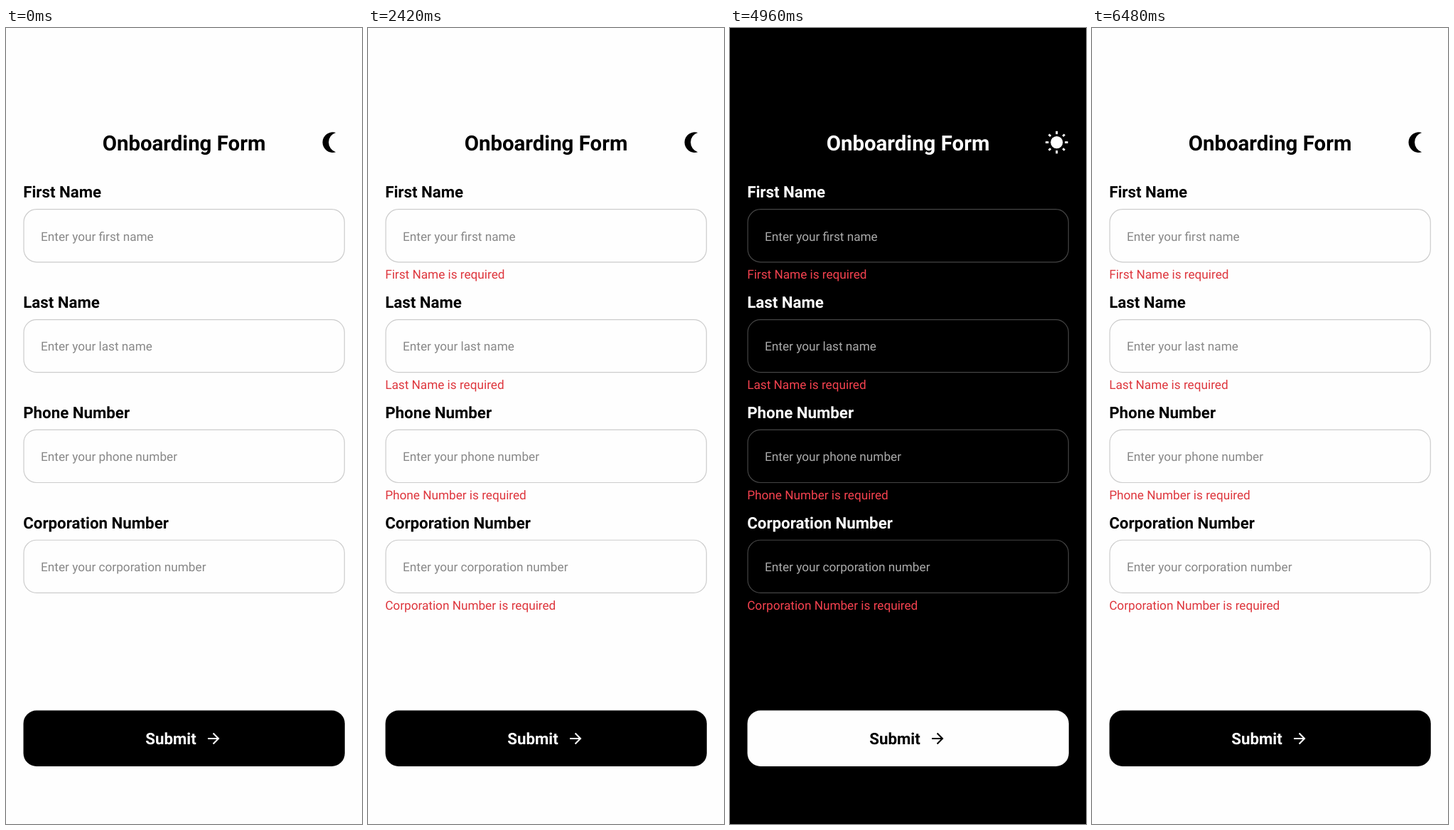
An HTML page that plays this animation: 501 px wide and 1118 px high, repeating every 7390 ms.

```html
<!DOCTYPE html>
<html lang="en">
<head>
<meta charset="utf-8">
<title>Onboarding Form</title>
<style>
  html, body { margin: 0; width: 100%; height: 100%; overflow: hidden; }

  svg {
    display: block;
    width: 501px;
    height: 1118px;
    background: var(--bg);
    font-family: Roboto, sans-serif;
    text-rendering: geometricPrecision;
    animation: theme 7390ms step-end infinite;
  }

  @keyframes theme {
    0%, 75.506% {
      --bg: #fefefe; --ink: #000; --line: #ccc; --hint: #888; --error: #de363d;
      --moon: 1; --sun: 0;
    }
    54.532% {
      --bg: #000; --ink: #fefefe; --line: #444; --hint: #aaa; --error: #f5424f;
      --moon: 0; --sun: 1;
    }
  }

  @keyframes validate {
    0% { opacity: 0; }
    32.745%, 100% { opacity: 1; }
  }

  .title, .label, .submit { font-weight: 700; fill: var(--ink); }
  .title { font-size: 29.4px; text-anchor: middle; }
  .label, .submit { font-size: 22.3px; }
  .hint, .error { font-size: 17.2px; }
  .hint { fill: var(--hint); }
  .error { fill: var(--error); animation: validate 7390ms step-end infinite; }
  .box { fill: none; stroke: var(--line); stroke-width: 1.2px; }
  .button, .icon { fill: var(--ink); }
  .submit, .arrow { fill: var(--bg); }
  .moon { opacity: var(--moon); }
  .sun { opacity: var(--sun); }
</style>
</head>
<body>
<svg viewBox="0 0 501 1118">
  <text class="title" x="250.5" y="172">Onboarding Form</text>

  <g class="icon" transform="translate(442.6 143.4) scale(1.433)">
    <path class="moon" d="M2 12A10 10 0 0 0 15 21.54A10 10 0 0 1 15 2.46A10 10 0 0 0 2 12Z"/>
    <g class="sun" id="sun"><circle cx="12" cy="12" r="6"/></g>
  </g>

  <g id="fields"></g>

  <rect class="button" x="24.5" y="958.5" width="452.3" height="78.5" rx="18.4"/>
  <text class="submit" x="196.2" y="1006.3">Submit</text>
  <path class="arrow" transform="translate(280 985.7) scale(1.0233)"
    d="M12 4L10.59 5.41L16.17 11H4V13H16.17L10.59 18.59L12 20L20 12Z"/>
</svg>
<script>
  const fields = ["First Name", "Last Name", "Phone Number", "Corporation Number"];
  const pitch = 154.85;

  const field = (name, i) => `
    <g transform="translate(0 ${i * pitch})">
      <text class="label" x="24.2" y="238.2">${name}</text>
      <rect class="box" x="25" y="254.7" width="451.3" height="74.1" rx="18"/>
      <text class="hint" x="49.1" y="298.6">Enter your ${name.toLowerCase()}</text>
      <text class="error" x="24.2" y="352.4">${name} is required</text>
    </g>`;

  const ray = (_, i) =>
    `<rect x="11" y="${i % 2 ? 1 : 1}" width="2" height="${i % 2 ? 2.55 : 3}" transform="rotate(${i * 45} 12 12)"/>`;

  document.getElementById("fields").innerHTML = fields.map(field).join("");
  document.getElementById("sun").innerHTML += Array.from({ length: 8 }, ray).join("");
</script>
</body>
</html>
```
